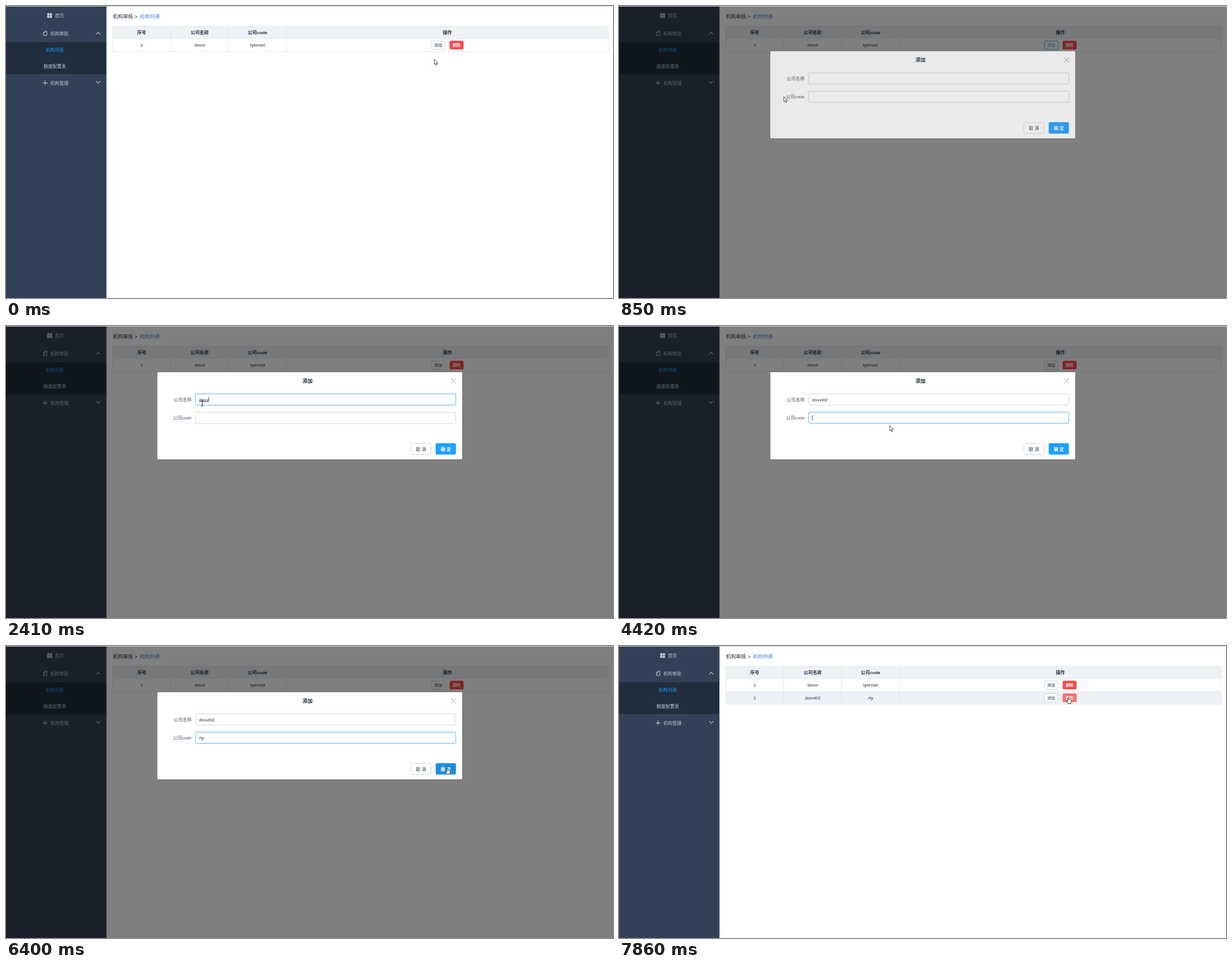
Animation, 1079 px wide and 519 px high, one loop 8000 ms. Source, as an HTML page:

```html
<!DOCTYPE html>
<html lang="zh">
<head>
<meta charset="utf-8">
<style>
html, body { margin: 0; width: 100%; height: 100%; overflow: hidden; background: #fff; }
svg { display: block; width: 1079px; height: 519px; }
text { font-family: "Liberation Sans", "Noto Sans CJK SC", "Noto Sans CJK", sans-serif; font-size: 8px; white-space: pre; }
</style>
</head>
<body>
<svg id="stage" viewBox="0 0 1079 519"></svg>
<script>
const stage = document.getElementById('stage');
const INK = '#1f2d3d', PALE = '#bfcbd9', BLUE = '#20a0ff', RED = '#ff4949', LINE = '#dfe6ec';
const NAME = 'dovvi';

// y is the vertical middle of the glyphs
const text = (x, y, s, fill = INK, extra = '') =>
  `<text x="${x}" y="${y + 2.9}" fill="${fill}" ${extra}>${s}</text>`;
const mid = (x, y, s, fill, extra = '') => text(x, y, s, fill, 'text-anchor="middle" ' + extra);
const rect = (x, y, w, h, fill, extra = '') =>
  `<rect x="${x}" y="${y}" width="${w}" height="${h}" fill="${fill}" ${extra}/>`;
const path = (d, color, width = 1) =>
  `<path d="${d}" fill="none" stroke="${color}" stroke-width="${width}"/>`;
const box = (x, y, w, h, id = '') =>
  rect(x, y, w, h, '#fff', `rx="2.5" stroke="${PALE}" stroke-width=".8" ${id}`);

const COLS = [190, 292.7, 395.5, 498.5, 1070.7];
const CENTERS = [241.3, 344.3, 447.2, 784.6];
const ROW_TOP = 58.5, ROW_H = 22.6;

const grid = (y, h) =>
  path(`M190 ${y + h}H1071` + COLS.map(x => `M${x} ${y}v${h}`).join(''), LINE, .9);

function row(n, cells) {
  const y = ROW_TOP + (n - 1) * ROW_H, c = y + 11;
  return `<g id="row${n}">` + rect(190, y, 881, ROW_H, '#fff', `id="bg${n}"`) + grid(y, ROW_H) +
    cells.map((s, i) => mid(CENTERS[i], c, s)).join('') +
    box(756.2, c - 7.4, 24.4, 15, `id="add${n}"`) +
    mid(768.3, c - .2, '添加', INK, `id="addText${n}" style="font-size:7px"`) +
    rect(788.6, c - 7.8, 24.8, 15.4, RED, `rx="2.5" id="del${n}"`) +
    mid(801, c - .2, '删除', '#fff', 'style="font-size:7px" font-weight="700"') + '</g>';
}

const sidebar =
  rect(0, 1, 178.6, 518, '#324157') + rect(0, 64.4, 178, 56.8, '#1f2d3d') +
  [[73.2, 12.8], [77.8, 12.8], [73.2, 17.2], [77.8, 17.2]].map(([x, y]) => rect(x, y, 4, 3.9, PALE)).join('') +
  path('M69 45H72.6V52.2H66.4V47.6ZM69 45V47.6H66.4', PALE, 1) +
  path('M65.4 136.6H73.6M69.5 132.5V140.7', PALE, 1.1) +
  path('M160.3 50.3L163.9 46.7L167.5 50.3M160.3 133.6L163.9 137.2L167.5 133.6', PALE, 1.1) +
  text(87, 16.7, '首页', PALE) + text(79, 48.6, '机构审批', PALE) +
  text(70.7, 78.2, '机构列表', BLUE) + text(66.8, 106.7, '额度配置表', PALE) + text(79, 136.7, '机构管理', PALE);

const page =
  text(190, 19, '机构审核 &gt;', INK, 'style="font-size:9px"') +
  text(237, 19, '机构列表', '#3b82dc', 'style="font-size:9px" font-style="italic"') +
  rect(190, 36, 881, 22.5, '#eef1f6') + path('M190 36H1071', LINE, .9) + grid(36, 22.5) +
  ['序号', '公司名称', '公司code', '操作'].map((s, i) => mid(CENTERS[i], 47, s, INK, 'font-weight="700"')).join('') +
  row(1, ['1', NAME, 'tyernsd']) + row(2, ['2', NAME + '02', 'rty']);

const dialog = '<g id="dialog">' +
  rect(269, 82, 542, 155, '#fff', 'rx="1.2" style="filter:drop-shadow(0 .6px .9px rgba(0,0,0,.25))"') +
  mid(536, 98.2, '添加', INK, 'style="font-size:9px" font-weight="700"') +
  path('M791.3 93.3L799.7 101.7M799.7 93.3L791.3 101.7', PALE, 1.4) +
  text(330, 130.7, '公司名称', '#48576a', 'text-anchor="end"') +
  text(330, 163.3, '公司code', '#48576a', 'text-anchor="end"') +
  box(336.8, 120.6, 462.8, 20, 'id="field1"') + box(336.8, 153.2, 462.8, 20, 'id="field2"') +
  text(343, 130.6, '', INK, 'id="value1"') + text(343, 163.2, '', INK, 'id="value2"') +
  rect(343, 134.2, 0, .7, INK, 'id="under"') + rect(343, 126, .8, 9, INK, 'id="caret"') +
  box(719.8, 208.7, 35.8, 19.8) + mid(737.7, 218.7, '取 消') +
  rect(763.8, 208.3, 36, 20.3, BLUE, 'rx="2.5" id="ok"') +
  mid(781.8, 218.7, '确 定', '#fff', 'font-weight="700"') + '</g>';

const pointers =
  '<path id="arrow" d="M0 0V9.2L2.1 7.3L3.6 10.6L5 10L3.6 6.8H6.4Z" fill="#fff" stroke="#222" stroke-width=".8"/>' +
  '<path id="beam" d="M-1.8 -5H-.4L0 -4.6L.4 -5H1.8M0 -4.6V4.6M-1.8 5H-.4L0 4.6L.4 5H1.8" fill="none" stroke="#111" stroke-width=".9"/>' +
  '<path id="hand" d="M-.9 5.8V.6Q0 -.6 .9 .6V3.6Q2 3 2.6 4Q3.8 3.4 4.3 4.5Q5.5 4.2 5.5 5.6V8L4.5 10.8H-.6L-3 7.2Q-3.4 5.6 -2 5.8L-.9 7Z" fill="#fff" stroke="#111" stroke-width=".8"/>';

stage.innerHTML = rect(0, 0, 1079, 519, '#fff') + sidebar + page +
  rect(0, 1, 1079, 518, '#000', 'id="veil"') + dialog + rect(0, 0, 1079, 1, '#d2d2d2') + pointers;

const $ = {};
stage.querySelectorAll('[id]').forEach(e => $[e.id] = e);

// each entry changes part of the state from its time on
const steps = [
  [0, { kind: 'arrow', at: [761.3, 94.8], veil: 0, show: 0, lift: 13.4, v1: '', v2: '', focus: 0, ime: 0,
        add: 0, ok: BLUE, rows: 1, del: 0 }],
  [120, { at: [764, 85] }],
  [270, { kind: 'hand', at: [767, 72], add: 1 }],
  [420, { at: [768, 70] }],
  [700, { kind: 'arrow', at: [700, 88], veil: .12, show: .1, lift: 12 }],
  [850, { at: [293, 161], veil: .5, show: .84, lift: 1.8 }],
  [1000, { at: [310, 156], show: 1, lift: 0 }],
  [1120, { at: [336, 145.5] }],
  [1240, { kind: 'beam', at: [349, 137.3] }],
  [1360, { add: 0, focus: 1 }],
  [1900, { v1: NAME.slice(0, 1), ime: 1 }],
  [2030, { v1: NAME.slice(0, 2) }],
  [2160, { v1: NAME.slice(0, 3) }],
  [2410, { v1: NAME.slice(0, 4) }],
  [2530, { v1: NAME }],
  [2800, { ime: 0 }],
  [3260, { v1: NAME + '0' }],
  [3410, { v1: NAME + '02' }],
  [3820, { at: [362, 148], kind: 'arrow' }],
  [3970, { at: [392, 163], kind: 'beam' }],
  [4120, { at: [400, 164], focus: 2 }],
  [4270, { at: [430, 168] }],
  [4420, { at: [481.3, 177], kind: 'arrow' }],
  [4540, { at: [510, 186] }],
  [4700, { at: [530, 192] }],
  [4850, { at: [538, 194] }],
  [5120, { v2: 'r' }],
  [5260, { v2: 'rt' }],
  [5400, { v2: 'rty' }],
  [5540, { at: [590, 208] }],
  [5680, { at: [680, 228] }],
  [5820, { at: [750, 232] }],
  [5960, { kind: 'hand', at: [779, 222], ok: '#4db3ff' }],
  [6090, { at: [784.2, 217.2] }],
  [6400, { ok: '#1d8ce0', focus: 3 }],
  [6520, { ok: '#4db3ff', veil: .07, show: .34, lift: 7.2, v1: '', v2: '', focus: 0, rows: 2 }],
  [6670, { kind: 'arrow', veil: 0, show: 0 }],
  [6800, { at: [755, 207] }],
  [6940, { at: [675, 182] }],
  [7080, { at: [570, 157] }],
  [7210, { at: [485, 138] }],
  [7350, { at: [451, 131] }],
  [7500, { at: [545, 121] }],
  [7620, { at: [690, 104] }],
  [7740, { kind: 'hand', at: [791, 93], del: 1 }],
  [7860, { at: [798.6, 91.6] }]
];

const set = (e, attrs) => { for (const k in attrs) e.setAttribute(k, attrs[k]); };
const show = (e, on) => set(e, { visibility: on ? 'visible' : 'hidden' });

function draw(t) {
  const s = {};
  for (const [start, change] of steps) if (start <= t) Object.assign(s, change);

  for (const k of ['arrow', 'beam', 'hand']) {
    show($[k], s.kind === k);
    set($[k], { transform: `translate(${s.at})` });
  }
  const hover = s.veil ? 0 : Math.floor((s.at[1] - ROW_TOP) / ROW_H) + 1;
  for (const n of [1, 2]) {
    set($['bg' + n], { fill: hover === n ? '#eef1f6' : '#fff' });
    set($['field' + n], { stroke: s.focus === n || (s.focus === 3 && n === 2) ? BLUE : PALE });
    $['value' + n].textContent = s['v' + n];
  }
  show($.row2, s.rows === 2);
  set($.add1, { stroke: s.add ? BLUE : PALE });
  set($.addText1, { fill: s.add ? BLUE : INK });
  set($.del2, { fill: s.del ? '#ff6d6d' : RED });
  set($.veil, { opacity: s.veil });
  set($.dialog, { opacity: s.show, transform: `translate(0 ${-s.lift})` });
  set($.ok, { fill: s.ok });

  const typing = s.focus === 1 || s.focus === 2;
  const value = s.focus === 2 ? $.value2 : $.value1;
  const width = value.textContent ? value.getComputedTextLength() : 0;
  set($.caret, { x: 342.9 + width, y: s.focus === 2 ? 158.6 : 126, opacity: typing ? 1 : 0 });
  set($.under, { width: s.ime ? width : 0 });
}

function tick() {
  draw(performance.now() % 8000);
  requestAnimationFrame(tick);
}
tick();
</script>
</body>
</html>
```
